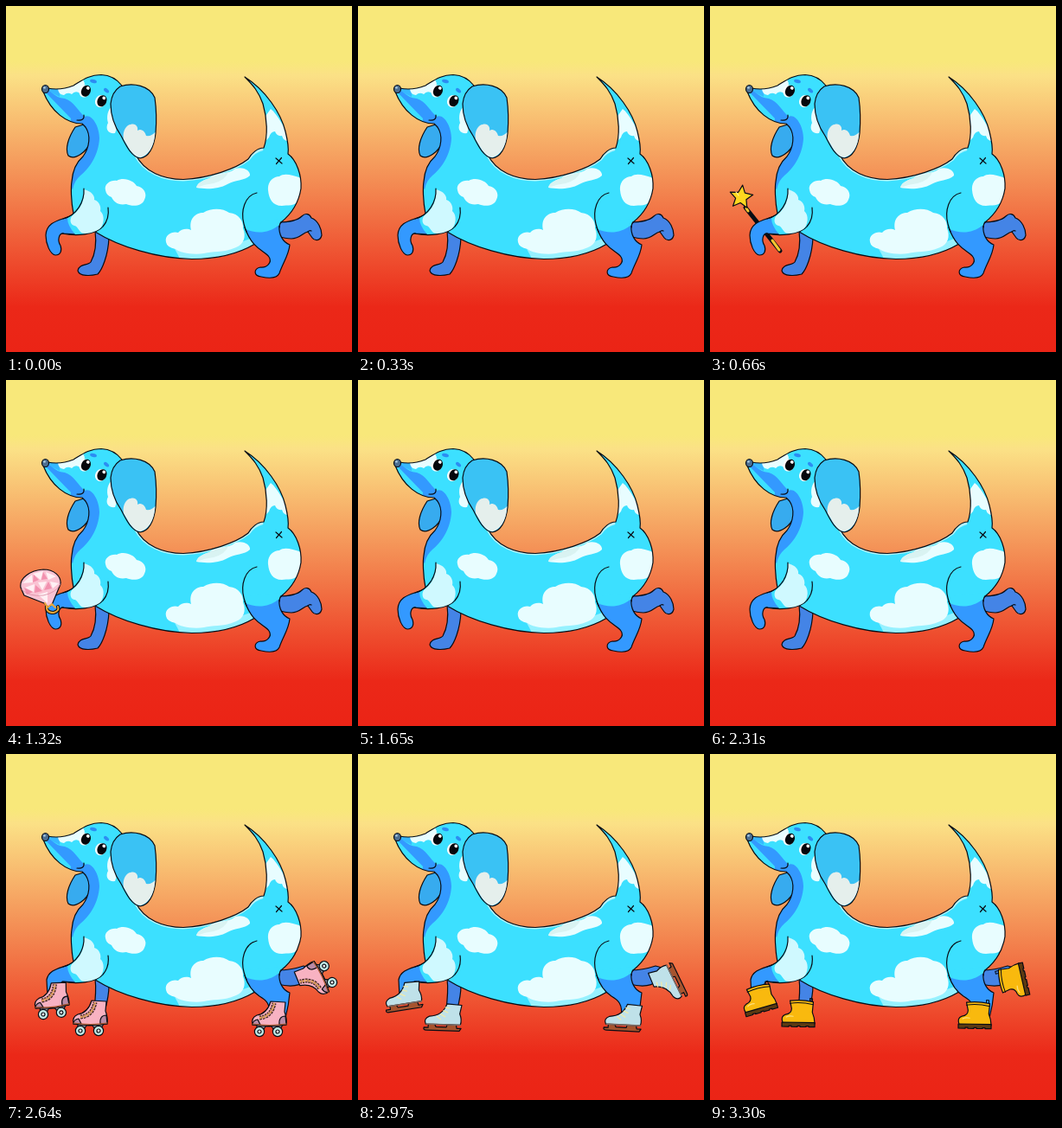
An HTML page that plays this animation: 400 by 400 pixels, repeating every 3.63 s.

```html
<!DOCTYPE html>
<html lang="en">
<head>
<meta charset="utf-8">
<title>Sky dog</title>
<style>
html, body { margin: 0; width: 100%; height: 100%; overflow: hidden; }
body { background: #eb2416; }
svg { display: block; width: 100vw; height: 100vh; }
.ink { stroke: #080c14; stroke-width: 1.2; stroke-linejoin: round; stroke-linecap: round; }
.line { fill: none; }
.sky { fill: #3ce0ff; }
.blue { fill: #3399ff; }
.far { fill: #4484e6; }
.cloud { fill: #e8fdff; }
[data-look] { display: none; }
</style>
</head>
<body>
<svg viewBox="0 0 400 400">
  <defs>
    <linearGradient id="dusk" x1="0" y1="0" x2="0" y2="1">
      <stop offset="0" stop-color="#f8e87a"/>
      <stop offset=".16" stop-color="#f8e87a"/>
      <stop offset=".2" stop-color="#fbe186"/>
      <stop offset=".87" stop-color="#eb2818"/>
      <stop offset="1" stop-color="#eb2416"/>
    </linearGradient>
    <path id="body" d="M48 95C58 97 68 96 78 92C88 86 96 79.500 110 79.500C120 80 128 84 134 92L150 172C160 192 182 200.500 205 200.500C235 199 266 188 280 177C284 170 291 164 298 164C303 150 302 130 297 113C292 99 286 92 276 82C300 97 318 124 323 145C326 157 327 165 326 171C336 178 342 196 341 211C338 230 328 242 318 250L300 258L290 270L287 275.500C264 289 240 292.500 215 292.500C175 292 130 278 103 261L82 248L78 240C75 225 75 209 76 203C77 190 82 180 89 174C97 163 98 149 92 140L88 136C70 136 52 122 43 99Z"/>
    <clipPath id="skin"><use href="#body"/></clipPath>

    <g id="slipper" class="ink">
      <path d="M0-1L30-4L53-5Q57-3 53-1L4 1Z" fill="#d9788c"/>
      <path d="M0 0L-1-4L0-7L-1-11L3-12L3-16L6-15L9-19L12-16L16-18L19-16L22-18L24-21L26-18L30-20L29-16L32-14L30-11L32-7L30-3Q15 0 0 0Z" fill="#f294a8"/>
      <path class="line" d="M5-6l3-2 3 2M12-10l3-2 3 2M18-5l3-2 3 2M22-13l3-2 2 2" stroke="#d66f88"/>
    </g>

    <g id="roller" class="ink">
      <path d="M-3-8H27L24-3H16L14-6H7L5-3H-3Z" fill="#8b8791"/>
      <path d="M13-35L30-34L29-23Q32-15 31-8Q12-5-8-8Q-10-16-3-19Q9-21 13-35Z" fill="#f8b2c2"/>
      <path d="M23-8Q22-18 30-18L31-8ZM-8-8Q-8-13-2-14L1-8Z" fill="#b98aa5"/>
      <path class="line" d="M-8-9Q12-6 31-9" style="stroke:#a9572f"/>
      <g class="line" stroke-linecap="butt">
        <path d="M0-16Q14-17 17-33" style="stroke:#3a2224;stroke-width:5;stroke-dasharray:2.500 1;stroke-linecap:butt"/>
        <path d="M0-16Q14-17 17-33" style="stroke:#e0a058;stroke-width:2.500;stroke-dasharray:2.500 1;stroke-linecap:butt"/>
      </g>
      <g fill="#bfe9e6"><circle r="5.600"/><circle cx="21" r="5.600"/></g>
      <g fill="#fff"><circle r="2"/><circle cx="21" r="2"/></g>
    </g>

    <g id="ice" class="ink">
      <path d="M-1-3Q-2 0 2 0H40L42-3H37L36-8H26L25-4H13L11-8H4L4-3Z" fill="#a7542e"/>
      <path d="M25-31L42-30L40-20Q43-13 41-7H1Q-2-13 5-16Q20-17 25-31Z" fill="#bfe1e9"/>
      <path class="line" d="M2-7H41" style="stroke:#7f6a62;stroke-width:1.600"/>
      <path class="line" d="M14-16l4 3M18-19l5 3M21-23l5 2M23-27l5 1" style="stroke:#f3eba6"/>
    </g>

    <g id="rain" class="ink">
      <path d="M10-30Q23-32 37-29L36-17Q39-10 39-4H2Q-1-12 5-14Q12-15 12-21Z" fill="#f9b90e"/>
      <path d="M1-5H39V0H32V-1H29V0H22V-1H19V0H12V-1H9V0H1Z" fill="#5d3a12"/>
      <path class="line" d="M10-27Q23-29 37-26M33-30v-3h3v4" stroke-width="1"/>
      <path class="line" d="M6-11Q9-13 14-12" style="stroke:#ffe07a"/>
    </g>
  </defs>

  <rect width="400" height="400" fill="url(#dusk)"/>

  <!-- far legs -->
  <g class="ink far">
    <g data-look="bare wand ring">
      <path d="M314 250C328 250 338 247 342 243C346 239 351 240 353 245C361 248 365 258 365 265C363 273 356 271 354 268L349 261C343 262 340 269 330 269C325 269 320 268 314 266Z"/>
      <path class="line" d="M349 261Q351 259 353 260"/>
      <path d="M103 260C105 276 103 287 98 296C95 300 84 298 83 306C85 313 98 312 106 310C111 305 118 289 119 268Z"/>
    </g>
    <g data-look="slipper roller ice rain">
      <path d="M314 250C328 250 338 247 344 245L355 248L360 266L346 262C340 268 330 270 314 266Z"/>
      <path d="M103 260C105 275 103 287 101 302L113 302C116 290 119 281 119 268Z"/>
    </g>
  </g>

  <path class="ink" fill="#37abef" d="M80 140C72 152 68 165 72 173C80 179 94 168 98 156C97 148 94 142 90 137Z"/>

  <!-- body and clouds -->
  <use href="#body" class="sky"/>
  <g clip-path="url(#skin)">
    <path class="blue" d="M40 94L52 99Q58 106 68 107C78 110 83 121 91 128C99 124 108 139 108 153C107 173 96 188 86 196Q79 202 77 212L65 200L75 130Z"/>
    <path fill="#36b8ff" d="M47 93L62 96L62 105L52 100Z"/>
    <path class="cloud" d="M60 95Q76 94 89 85Q94 92 86 101Q80 97 76 102Q71 99 67 103Q60 102 60 95Z"/>
    <path class="cloud" d="M124 115C117 119 116 129 118 135C114 143 119 148 126 147L132 130Z"/>
    <path fill="none" stroke="#b4f5ff" stroke-width="4" d="M150 172C160 192 182 200.500 205 200.500C235 199 266 188 280 177Q287 167 297 165"/>
    <path class="cloud" d="M115 213C113 206 121 201 128 202C136 197 148 202 151 208C159 209 164 217 160 224C157 232 146 232 139 229C130 231 124 226 122 221Q116 219 115 213Z"/>
    <path class="cloud" d="M220 210C222 203 230 201 235 199C244 192 257 195 265 188C275 185 283 191 282 196C276 202 264 201 256 206C246 212 230 212 220 210Z"/>
    <path fill="#d9f3f2" d="M220 210C222 203 230 201 235 199C242 195 250 195 257 192Q254 201 240 205Q230 206 220 210Z"/>
    <path fill="#96f1ff" d="M194 279Q240 287 285 268V284Q245 300 202 294Q198 286 194 279Z"/>
    <path class="cloud" d="M185 273C183 264 193 260 199 262C203 257 210 257 214 259C211 246 219 239 228 239C238 233 251 234 258 239C269 240 275 249 274 257C278 266 275 276 266 279C250 286 238 283 229 286C215 288 201 285 196 281Q186 279 185 273Z"/>
    <path class="cloud" d="M303 213C302 203 309 197 316 197C322 192 333 196 345 200L340 224C334 232 325 230 319 231C308 231 304 223 303 213Z"/>
    <path class="cloud" d="M306 119C313 124 326 146 328 156Q321 157 319 150Q313 151 311 145Q306 145 304 152L298 158V130Z"/>
  </g>
  <use href="#body" class="ink line"/>
  <path class="ink line" d="M312 176l7 6M318.500 175.500l-6 7M82 132Q91 133 90 126"/>

  <!-- face -->
  <ellipse class="ink" cx="45.500" cy="96" rx="4" ry="4.500" fill="#4c6f92"/>
  <ellipse cx="44.500" cy="94.500" rx="1.400" ry="1" fill="#b9d9ef"/>
  <g fill="#2c8df2">
    <ellipse cx="101" cy="87" rx="4" ry="2" transform="rotate(15 101 87)"/>
    <ellipse cx="116.500" cy="97.500" rx="3.500" ry="2" transform="rotate(40 116 97)"/>
  </g>
  <g id="eyes"></g>

  <path class="ink" fill="#3ac2f4" d="M132 93C147 88 166 92 172 106C174 120 174 135 173 147C171 165 164 175 155 176C144 174 138 159 133 150C126 140 121 126 121 113C122 103 126 97 132 93Z"/>
  <path fill="#e5efec" d="M136 154C134 144 140 137 144 137C150 135 153 140 152 144C157 141 161 146 162 150Q168 151 172.300 146C172 162 164 174 155 175C146 174 141 162 136 154Z"/>

  <!-- near hind leg -->
  <path class="sky" d="M290 216C276 220 271 236 275 252L283 270L312 264L317 250Z"/>
  <path class="ink blue" data-look="bare wand ring" d="M316 254C315 264 320 273 328 276C327 288 320 297 316 309C313 315 304 315 295 313C286 312 286 304 294 302C302 303 308 296 304 290C300 283 285 282 276 256"/>
  <path class="ink blue" data-look="slipper roller ice rain" d="M316 254C315 264 320 273 328 276Q327 290 323 305H304C307 289 300 284 293 280Q281 272 276 256"/>
  <path class="sky" d="M275.500 250L277 258C288 263 303 264 315.500 253L314 246Z"/>
  <path class="ink line" d="M290 216C276 219 271 237 275 252Q276 256 278 261M318 250Q316 252 316 256"/>

  <!-- wand sits behind the paw -->
  <g data-look="wand" class="ink">
    <path class="line" d="M41 233L81 283" stroke-width="5" style="stroke-width:5"/>
    <path class="line" d="M42 234L44 237M72 271L80 282" style="stroke:#f5c62f;stroke-width:3"/>
    <path id="star" fill="#ffd71f"/>
    <path class="line" d="M30 215l3 4" style="stroke:#fff3a0"/>
  </g>

  <!-- raised arm -->
  <path class="sky" d="M90 211C91 226 82 242 66 246L65 263C80 267 104 264 112 255C118 248 119 240 118 233Z"/>
  <path class="ink blue" data-look="bare wand ring" d="M78 241C66 248 47 247 46 265C46 275 51 287 57 288C63 288 65 283 63 277C59 271 61 262 67 263L80 264"/>
  <path class="ink blue" data-look="slipper roller ice rain" d="M78 241C66 248 50 247 47 261L48 280L62 280Q60 263 67 263L80 264"/>
  <path class="sky" d="M79 240L71 245Q71 254 80 264L92 263L91 225Z"/>
  <path fill="#cff9ff" d="M90 212C99 214 103 220 102 224C109 226 110 234 109 237C115 242 113 254 108 258C101 264 91 264 87 262C83 258 82 254 79 254C74 253 73 246 77 242C87 234 91 224 90 212Z"/>
  <path class="ink line" d="M90 211C91 226 82 242 66 246M65 263C80 266 104 265 112 255C118 248 119 240 118 233"/>

  <!-- gem ring -->
  <g data-look="ring" class="ink">
    <path class="line" d="M47 261Q46 269 55 269Q62 267 60 262" style="stroke:#111;stroke-width:4"/>
    <path class="line" d="M47 261Q46 269 55 269Q62 267 60 262" style="stroke:#e8a73a;stroke-width:2"/>
    <path d="M17 240C15 229 28 220 43 219C56 219 64 227 63 236L53 260Q48 264 44 258L21 249Z" fill="#fac3d3"/>
    <g fill="#fff0f4" stroke="none">
      <path d="M19 235L30 225L31 234ZM31 224L43 221L40 231ZM46 222L58 227L49 231ZM22 240L33 236L32 245ZM37 234L47 233L42 243ZM51 233L61 235L54 241ZM37 248L48 245L48 258Z"/>
    </g>
    <g fill="#f291af" stroke="none">
      <path d="M32 225L31 234L38 231ZM43 222L41 231L48 230ZM21 240L31 245L24 248ZM34 237L42 244L33 246ZM49 233L53 241L44 243Z"/>
    </g>
    <path class="line" d="M18 242Q27 251 43 249Q58 246 63 236" style="stroke:#d98ca2;stroke-width:.8"/>
    <path class="line" d="M45 258l3 5 5-4 4 4" style="stroke:#e8a73a;stroke-width:2"/>
  </g>

  <g id="shoes"></g>
</svg>
<script>
const STEP = 330;
const looks = ['bare', 'bare', 'wand', 'bare', 'ring', 'bare',
  'slipper', 'bare', 'roller', 'ice', 'rain'];

// Each shoe: x, y and angle for far hind, far front, near hind, raised paw.
const fits = {
  slipper: [[374, 288, -112], [71, 315, 0], [274, 317, 0], [66, 303, -94]],
  roller: [[377, 264, -116], [86, 320, 0], [293, 321, 0], [43, 301, -6]],
  ice: [[381, 278, -116], [77, 319, 2], [285, 319, 3], [34, 299, -9]],
  rain: [[370, 279, -103], [82, 315, 1], [286, 317, 1], [41, 304, -16]]
};
const byId = id => document.getElementById(id);

byId('shoes').innerHTML = Object.entries(fits).map(([name, spots]) =>
  `<g data-look="${name}">` + spots.map(([x, y, a]) =>
    `<use href="#${name}" transform="translate(${x} ${y}) rotate(${a})"/>`).join('') + '</g>'
).join('');

byId('eyes').innerHTML = [[92, 98], [110.500, 109.500]].map(([x, y]) =>
  `<g transform="translate(${x} ${y}) rotate(25)">
    <ellipse cx="-.8" cy="1" rx="6.200" ry="7.200" fill="#fff"/>
    <ellipse cx=".5" rx="5.300" ry="6.800" fill="#05070c"/>
    <circle cx="1.200" cy="-4" r="1.900" fill="#fff"/></g>`).join('');

const star = Array.from({ length: 10 }, (_, i) => {
  const a = i * Math.PI / 5 - 1.45, r = i % 2 ? 6.5 : 14;
  return [36 + r * Math.cos(a), 221 + r * Math.sin(a)].map(n => n.toFixed(1)).join(' ');
});
byId('star').setAttribute('d', 'M' + star.join('L') + 'Z');

const parts = [...document.querySelectorAll('[data-look]')];
const start = performance.now();
let shown;

function draw() {
  const t = Math.max(0, performance.now() - start);
  const look = looks[Math.floor(t / STEP) % looks.length];
  if (look !== shown) {
    shown = look;
    for (const p of parts)
      p.style.display = p.dataset.look.split(' ').includes(look) ? 'inline' : 'none';
  }
  requestAnimationFrame(draw);
}
draw();
</script>
</body>
</html>
```
